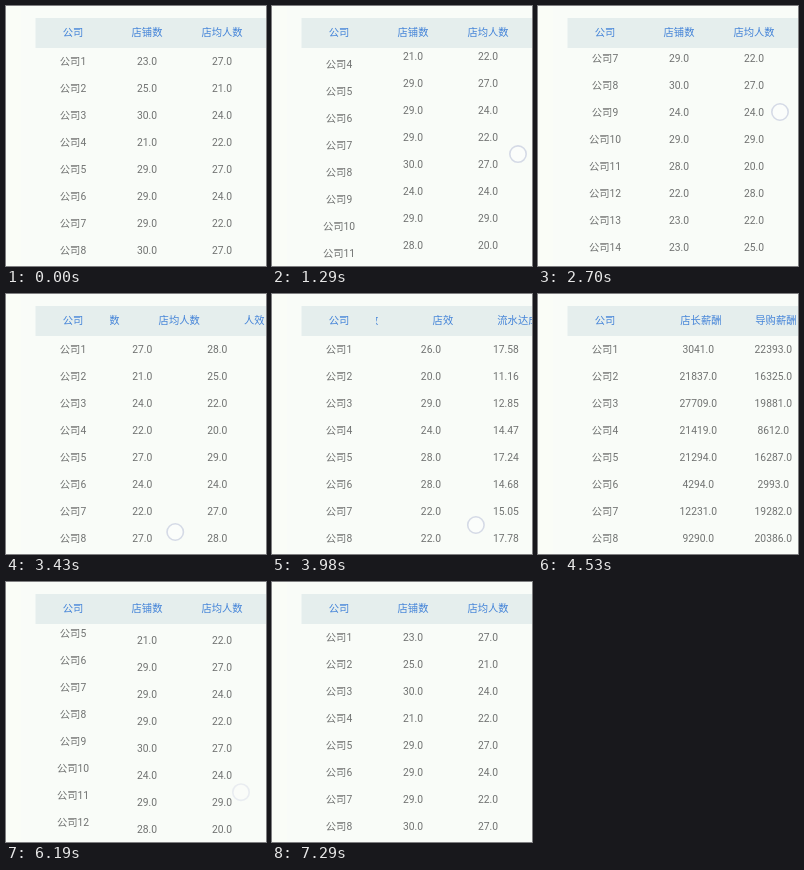
These frames come from a looping animation (260x260 px, 7.35 s). An HTML page with a canvas:

```html
<!DOCTYPE html>
<html lang="zh-CN">
<head>
<meta charset="utf-8">
<title>表格滚动</title>
<style>
html, body { margin: 0; width: 100%; height: 100%; overflow: hidden; background: #f9fcf8; }
canvas { display: block; width: 100vw; height: 100vh; }
</style>
</head>
<body>
<canvas id="stage"></canvas>
<script>
const SIZE = 260, LOOP = 7350, STEP = LOOP / 120;
const LEFT = 29.5, FIXED = 104, TOP = 12, HEAD = 42;
const FIRST_X = 141, PITCH = 75, FIRST_Y = 55, ROW = 27, ROWS = 15;

const canvas = document.getElementById('stage');
const ctx = canvas.getContext('2d');
const dpr = window.devicePixelRatio || 1;
canvas.width = canvas.height = Math.round(SIZE * dpr);

const words = text => text.split(' ');

function seeded(seed) {
  return Array.from({ length: ROWS }, () => {
    seed = (seed * 1103515245 + 12345) % 2147483648;
    return (20 + Math.floor(seed / 2147483648 * 11)).toFixed(1);
  });
}

const companies = Array.from({ length: ROWS }, (_, i) => '公司' + (i + 1));
const columns = [
  ['店铺数', words('23.0 25.0 30.0 21.0 29.0 29.0 29.0 30.0 24.0 29.0 28.0 22.0 23.0 23.0 30.0')],
  ['店均人数', words('27.0 21.0 24.0 22.0 27.0 24.0 22.0 27.0 24.0 29.0 20.0 28.0 22.0 25.0 20.0')],
  ['人效', seeded(17)],
  ['店效', words('26.0 20.0 29.0 24.0 28.0 28.0 22.0 22.0')],
  ['流水达成', words('17.58 11.16 12.85 14.47 17.24 14.68 15.05 17.78')],
  ['毛利', seeded(5)],
  ['店长薪酬', words('3041.0 21837.0 27709.0 21419.0 21294.0 4294.0 12231.0 9290.0')],
  ['导购薪酬', words('22393.0 16325.0 19881.0 8612.0 16287.0 2993.0 19282.0 20386.0')]
];

const linear = p => p;
const easeIn = p => p * p;
const easeOut = p => 1 - (1 - p) ** 2;
const fling = p => 1 - (1 - p) ** 5;
const smooth = p => p * p * (3 - 2 * p);

// Each move adds its distance: start, end, distance, easing
const movesY = [
  [628, 2106, 193, linear],
  [2330, 2600, -28, easeOut],
  [2700, 2940, -165, smooth],
  [5468, 5635, 193, linear],
  [5800, 6300, -193, easeIn]
];
const movesX = [
  [3310, 3690, 150, easeOut],
  [3690, 4100, 80.4, linear],
  [4100, 4780, 201.6, fling],
  [4840, 5400, -432, smooth]
];

function travel(moves, t) {
  return moves.reduce((sum, [start, end, distance, ease]) => {
    const p = Math.min(1, Math.max(0, (t - start) / (end - start)));
    return sum + distance * ease(p);
  }, 0);
}

// A finger keeps one coordinate and drags the content with the other.
const touches = [
  { start: 628, end: 1650, x: 246, grabY: 234 },
  { start: 2330, end: 2940, x: 242, grabY: 271 },
  { start: 3310, end: 3640, y: 238, grabX: 249 },
  { start: 3690, end: 4230, y: 231, grabX: 411 },
  { start: 4840, end: 5150, y: 208, grabX: 562 },
  { start: 5468, end: 5700, x: 235, grabY: 378 },
  { start: 5800, end: 6240, x: 235, grabY: 288 }
];

function drawTouch({ start, end, x, y, grabX, grabY }, t) {
  if (t < start || t >= end) return;
  const cx = x ?? grabX - travel(movesX, t);
  const cy = y ?? grabY - travel(movesY, t);
  ctx.globalAlpha = Math.min(1, (end - t) / 120);
  ctx.beginPath();
  ctx.arc(cx, cy, 8.2, 0, Math.PI * 2);
  ctx.fillStyle = 'rgba(251,253,252,0.75)';
  ctx.fill();
  ctx.strokeStyle = '#d5dae6';
  ctx.lineWidth = 1.6;
  ctx.stroke();
  ctx.globalAlpha = 1;
}

function clipped(x, y, w, h, paint) {
  ctx.save();
  ctx.beginPath();
  ctx.rect(x, y, w, h);
  ctx.clip();
  paint();
  ctx.restore();
}

function label(text, x, y) {
  ctx.fillText(text, x, y + 3.7);
}

function drawColumn(cells, x, offset) {
  cells.forEach((cell, i) => label(cell, x, FIRST_Y + i * ROW - offset));
}

function draw(t) {
  ctx.setTransform(canvas.width / SIZE, 0, 0, canvas.height / SIZE, 0, 0);
  ctx.fillStyle = '#f9fcf8';
  ctx.fillRect(0, 0, SIZE, SIZE);
  ctx.fillStyle = '#fafdf7';
  ctx.fillRect(0, 0, 15, SIZE);
  ctx.fillStyle = '#e5eeed';
  ctx.fillRect(LEFT, TOP, SIZE - LEFT, HEAD - TOP);

  ctx.font = '10.3px Roboto, "Noto Sans CJK SC", "Noto Sans CJK", sans-serif';
  ctx.textAlign = 'center';

  // The header and the fixed column trail the body by one refresh.
  const bodyX = travel(movesX, t), headX = travel(movesX, t - STEP);
  const bodyY = travel(movesY, t), fixedY = travel(movesY, t - STEP);

  ctx.fillStyle = '#4383d8';
  label('公司', 67, 26);
  clipped(FIXED, TOP, SIZE - FIXED, HEAD - TOP, () => {
    columns.forEach(([title], i) => label(title, FIRST_X + i * PITCH - headX, 26));
  });

  ctx.fillStyle = '#707271';
  clipped(LEFT, HEAD, FIXED - LEFT, SIZE - HEAD, () => drawColumn(companies, 67, fixedY));
  clipped(FIXED, HEAD, SIZE - FIXED, SIZE - HEAD, () => {
    columns.forEach(([, cells], i) => drawColumn(cells, FIRST_X + i * PITCH - bodyX, bodyY));
  });

  touches.forEach(touch => drawTouch(touch, t));
}

function frame() {
  const now = performance.now() % LOOP;
  draw(Math.floor((now + 5) / STEP) * STEP);
  requestAnimationFrame(frame);
}
frame();
</script>
</body>
</html>
```
